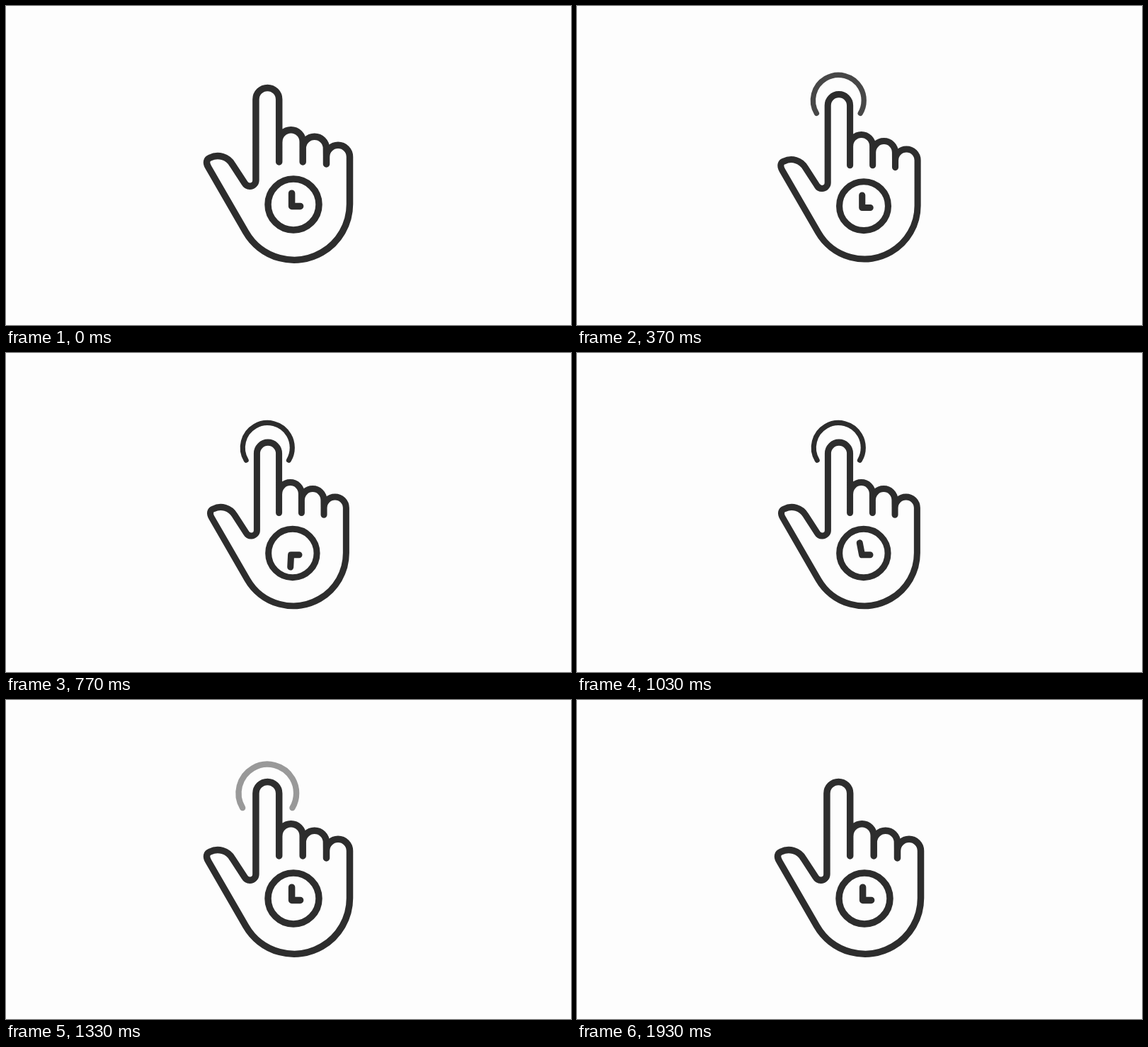
An HTML page with a canvas that plays this animation: 798x450 px, repeating every 2.01 s.

```html
<!DOCTYPE html>
<html lang="en">
<head>
<meta charset="utf-8">
<title>Press and hold</title>
<style>
  html, body { margin: 0; width: 100%; height: 100%; overflow: hidden; background: #fdfdfd; }
  canvas { display: block; }
</style>
</head>
<body>
<canvas id="stage" width="798" height="450"></canvas>
<script>
const ctx = document.getElementById('stage').getContext('2d');
const LOOP = 2010;
const PAPER = '#fdfdfd';
const INK = '#2d2d2d';
const LINE = 9.5;
const RAD = Math.PI / 180;

const lerp = (a, b, p) => a + (b - a) * p;
const progress = (t, from, to) => Math.min(1, Math.max(0, (t - from) / (to - from)));
const ease = (t, from, to) => {
  const p = progress(t, from, to);
  return p * p * (3 - 2 * p);
};

// Piecewise linear value through [time, value] keys.
function keyed(t, keys) {
  for (let i = 1; i < keys.length; i++) {
    const [t0, v0] = keys[i - 1], [t1, v1] = keys[i];
    if (t < t1) return lerp(v0, v1, progress(t, t0, t1));
  }
  return keys[keys.length - 1][1];
}

function outlinePath() {
  const p = new Path2D();
  // index finger
  p.moveTo(385.7, 220);
  p.lineTo(385.7, 131.8);
  p.arc(369.3, 131.8, 16.4, 0, Math.PI, true);
  // thumb
  p.lineTo(352.9, 246);
  p.arc(344.4, 245.7, 8.5, 0, 150 * RAD);
  p.lineTo(319.8, 223.5);
  p.arc(299, 235.5, 24, -30 * RAD, -117 * RAD, true);
  p.bezierCurveTo(283.3, 216, 281.8, 220.5, 285.8, 227.5);
  // palm and little finger
  p.arc(406.8, 279.5, 78.7, 150 * RAD, 0, true);
  p.lineTo(485.5, 212.7);
  p.arc(469, 212.7, 16.5, 0, Math.PI, true);
  p.lineTo(452.5, 223);
  // middle fingers
  p.moveTo(452.5, 212);
  p.arc(435.8, 200.9, 16.6, 0, Math.PI, true);
  p.lineTo(419.2, 220);
  p.moveTo(419.2, 200);
  p.arc(402.5, 191.5, 16.7, 0, Math.PI, true);
  return p;
}
const outline = outlinePath();

function drawClock(turn) {
  ctx.beginPath();
  ctx.arc(406, 280, 36, 0, 2 * Math.PI);
  ctx.stroke();

  const x = 403.6, y = 282.4, reach = 18.2;
  ctx.beginPath();
  ctx.moveTo(x + reach * Math.sin(turn), y - reach * Math.cos(turn));
  ctx.lineTo(x, y);
  ctx.lineTo(x + 12, y);
  ctx.stroke();
}

function drawHand(t) {
  const press = ease(t, 167, 433) - ease(t, 1160, 1330);
  const scale = 1 - 0.05 * press;
  ctx.save();
  ctx.translate(383, 330);
  ctx.scale(scale, scale);
  ctx.translate(-383, -330);
  ctx.lineWidth = LINE;
  ctx.stroke(outline);
  drawClock(ease(t, 433, 1100) * 2 * Math.PI);
  ctx.restore();
}

function drawRing(t) {
  const alpha = keyed(t, [
    [160, 0], [400, 1], [1160, 1], [1290, 0.45], [1330, 0.48],
    [1450, 0.75], [1570, 0.69], [1730, 0]
  ]);
  if (alpha <= 0) return;
  const radius = t < 1130
    ? lerp(41.3, 35, ease(t, 167, 433))
    : lerp(35, 59.4, ease(t, 1130, 1760));
  ctx.save();
  ctx.globalAlpha = alpha;
  ctx.lineWidth = radius * 0.205;
  ctx.beginPath();
  ctx.arc(369.3, lerp(133.5, 130, progress(radius, 35, 45)), radius, 149.5 * RAD, 30.5 * RAD);
  ctx.stroke();
  ctx.restore();
}

function frame(now) {
  const t = now % LOOP;
  ctx.fillStyle = PAPER;
  ctx.fillRect(0, 0, 798, 450);
  ctx.strokeStyle = INK;
  ctx.lineCap = ctx.lineJoin = 'round';
  drawRing(t);
  drawHand(t);
}

let start;
function tick(now) {
  start ??= now;
  frame(now - start);
  requestAnimationFrame(tick);
}
frame(0);
requestAnimationFrame(tick);
</script>
</body>
</html>
```
